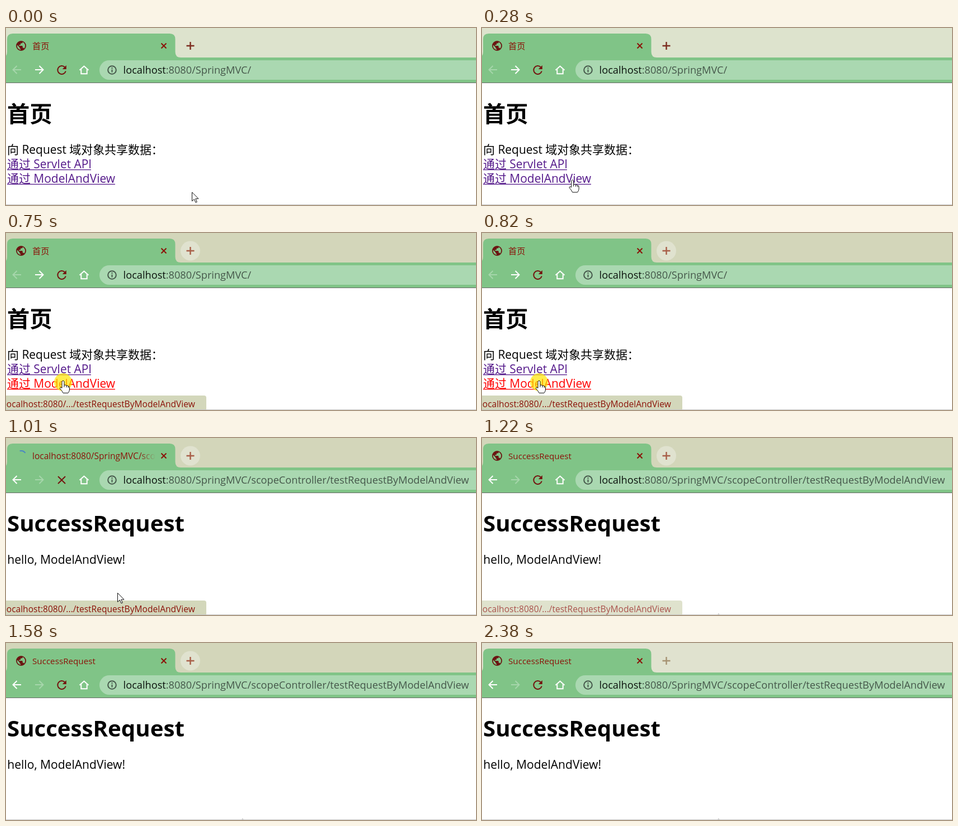
An HTML page for the animation above (2.45 s loop, 840 by 318 pixels).

```html
<!DOCTYPE html>
<html lang="zh-CN">
<head>
<meta charset="utf-8">
<title>SpringMVC</title>
<style>
html, body { margin: 0; width: 100%; height: 100%; overflow: hidden; background: #fff; }
svg { display: block; width: 100%; height: 100%; }
text { font-family: "Open Sans", "Noto Sans CJK SC", "Noto Sans CJK JP", sans-serif; white-space: pre; }
.tab { font-size: 15.2px; fill: #8b1209; }
.status { font-size: 15.55px; fill: #8b1209; }
.url { font-size: 18.18px; fill: #45574a; }
.url .host { fill: #0b120d; }
.h1 { font-size: 40.2px; font-weight: 700; }
.p { font-size: 20.95px; }
.icon { fill: none; stroke-width: 2; }
.link { fill: #551a8b; }
</style>
</head>
<body>
<svg viewBox="0 0 840 318" xmlns="http://www.w3.org/2000/svg">
  <defs>
    <linearGradient id="fade" gradientUnits="userSpaceOnUse" x1="238" y1="0" x2="267" y2="0">
      <stop offset="0" stop-color="#8b1209"/>
      <stop offset="1" stop-color="#8b1209" stop-opacity="0"/>
    </linearGradient>
    <path id="arrow" d="M16 0H1.5M8.5 -7L1.5 0 8.5 7"/>
  </defs>

  <rect width="840" height="318" fill="#fff"/>

  <!-- tab strip -->
  <rect id="strip" width="840" height="53"/>
  <circle id="plusBg" cx="329.5" cy="32" r="17.5" fill="#e0e2cf"/>
  <path id="plus" class="icon" d="M322.5 32H336.5M329.5 25V39" style="stroke-width:2.4"/>
  <path fill="#80c487" d="M-8 53Q2 53 2 43V20Q2 10 12 10H292.500Q302.500 10 302.500 20V43Q302.500 53 312.500 53Z"/>
  <path id="globe" fill="#6b1512" transform="translate(16.200 21.200) scale(.9)" d="M12 2A10 10 0 1 0 12 22 10 10 0 1 0 12 2ZM11 19.930C7 19.400 4 16 4 12Q4 11 4.210 10.210L9 15V16Q9 18 11 18ZM17.900 17.390Q17.400 16 16 16H15V13Q15 12 14 12H8V10H10Q11 10 11 9V7H13Q15 7 15 5V4.590C18 5.800 20 8.700 20 12Q20 15 17.900 17.390Z"/>
  <path id="spin" class="icon" d="M0 -9A9 9 0 0 1 8.5 -3" stroke="#4a86c4"/>
  <text id="tabHome" class="tab" x="47" y="37.5">首页</text>
  <text id="tabLoad" class="status" x="47" y="38" style="fill:url(#fade)">localhost:8080/SpringMVC/sco</text>
  <text id="tabDone" class="tab" x="47" y="38">SuccessRequest</text>
  <path class="icon" d="M277.500 27.500L286.500 36.500M286.500 27.500L277.500 36.500" stroke="#8b1209"/>

  <!-- toolbar -->
  <rect y="53" width="840" height="45" fill="#80c487"/>
  <rect y="98" width="840" height="1" fill="#686c68"/>
  <rect x="167" y="58" width="720" height="35" rx="17.5" fill="#aad8b1"/>
  <use id="back" class="icon" href="#arrow" x="11" y="75"/>
  <use id="forward" class="icon" href="#arrow" transform="translate(68 75) scale(-1 1)"/>
  <g id="reload">
    <path class="icon" d="M105 70.300A7.400 7.400 0 1 0 106.800 77.500" stroke="#74140f"/>
    <path d="M107.800 67V74H100.800Z" fill="#74140f"/>
  </g>
  <path id="stop" class="icon" d="M93 69L106 82M106 69L93 82" stroke="#74140f"/>
  <path class="icon" d="M131.500 75.800L139.500 68.500 147.500 75.800M134.300 74V82.300H144.700V74" stroke="#fff"/>
  <circle class="icon" cx="189.5" cy="75.500" r="7.300" stroke="#45574a"/>
  <path class="icon" d="M189.500 74.500V79.500M189.500 71V73" stroke="#45574a"/>
  <text class="url" x="209.6" y="82"><tspan class="host">localhost</tspan>:8080/SpringMVC/<tspan id="path">scopeController/testRequestByModelAndView</tspan></text>

  <!-- pages -->
  <g id="home">
    <text class="h1" x="2" y="169">首页</text>
    <text class="p" x="2" y="226">向 Request 域对象共享数据：</text>
    <g class="link">
      <text class="p" x="2" y="252">通过 Servlet API</text>
      <rect x="2" y="254" width="150" height="1.3"/>
    </g>
    <g id="link" class="link">
      <text class="p" x="2" y="278">通过 ModelAndView</text>
      <rect x="2" y="280" width="193" height="1.3"/>
    </g>
  </g>
  <g id="result">
    <text class="h1" x="2" y="168">SuccessRequest</text>
    <text class="p" x="2.3" y="226" style="font-size:21.05px">hello, ModelAndView!</text>
  </g>

  <g id="status">
    <path d="M0 292H354Q358 292 358 296V318H0Z" fill="#d3d7bb"/>
    <text class="status" x="-3.2" y="312.5">localhost:8080/.../testRequestByModelAndView</text>
  </g>
  <rect y="317" width="840" height="1" fill="#c6c6c6"/>

  <!-- pointer -->
  <circle id="glow" cx="102" cy="268" r="16" fill="#ffe600" fill-opacity=".7"/>
  <path id="tip" d="M421 317L422.500 314.500 425 317Z" fill="#d0d0d0"/>
  <path id="pointer" d="M.5 .5V16.500L4.300 13 7 19 9.300 18 6.800 12.200H12Z" fill="#fff" stroke="#111"/>
  <g id="hand" stroke="#111" stroke-linejoin="round">
    <path fill="#fff" d="M-2 2Q0 -1.500 2 2V8.500Q4.500 7 6 9.500 8.500 8 9.300 10.500 11.500 10 11.500 13V17Q11 20 9 22.500H0Q-2 18 -5.500 14.500 -6 11 -2 13.500Z"/>
    <path fill="none" d="M2 8.500V12M6 9.500V12.500M9.300 10.500V13"/>
  </g>
</svg>
<script>
const LOOP = 2450;
const TICKS = [0, 70, 140, 210, 280, 350, 480, 680, 750, 820, 890, 950, 1010, 1080, 1150,
  1220, 1290, 1360, 1430, 1510, 1580, 2380];
const PRESS = 680, RELEASE = 890, COMMIT = 950, REST = 1150, LOADED = 1220, BLUR = 2380;

const $ = id => document.getElementById(id);
const set = (id, name, value) => $(id).setAttribute(name, value);
const show = (id, on) => set(id, 'opacity', Number(on));
const clamp = v => Math.max(0, Math.min(1, v));
const part = (t, a, b) => clamp((t - a) / (b - a));
const mix = (a, b, k) => a + (b - a) * k;

function pointerAt(t) {
  if (t < RELEASE) {
    const k = part(t, 0, 420), e = k * k * (3 - 2 * k);
    return [mix(332, 102, e), mix(294.5, 265, e)];
  }
  if (t < 1010) {
    const k = part(t, 820, 1010);
    return [mix(102, 199, k * k), mix(265, 278, k)];
  }
  const k = part(t, 1010, REST);
  return [mix(199, 421, k), mix(278, 315, k)];
}

function draw(now) {
  const time = now % LOOP;
  const t = TICKS.filter(v => v <= time).pop();
  const focused = t >= PRESS && t < BLUR;
  const loading = t >= RELEASE && t < LOADED;
  const committed = t >= COMMIT;

  set('strip', 'fill', focused ? '#d3d6ba' : t < PRESS ? '#dde3cd' : '#e0e2cf');
  set('plus', 'stroke', focused ? '#a85e48' : t < PRESS ? '#7d2d20' : '#a69272');
  show('plusBg', focused);

  show('globe', !loading);
  show('spin', loading);
  set('spin', 'transform', `translate(27 32) rotate(${(t - 1010) * 0.5 - 15})`);
  show('tabHome', !committed);
  show('tabLoad', committed && loading);
  show('tabDone', t >= LOADED);
  show('reload', !loading);
  show('stop', loading);
  set('back', 'stroke', committed ? '#fff' : '#a6d6ab');
  set('forward', 'stroke', committed ? '#a6d6ab' : '#fff');
  $('path').style.display = committed ? '' : 'none';

  show('home', !committed);
  show('result', committed);
  $('link').style.fill = t >= PRESS && t < RELEASE ? '#f00' : '';
  show('status', t < LOADED ? part(t, 280, 420) : 0.72 * (1 - part(t, LOADED, 1580)));

  const [x, y] = pointerAt(t);
  const onLink = t >= 280 && t < COMMIT;
  for (const id of ['pointer', 'hand']) set(id, 'transform', `translate(${x} ${y})`);
  show('hand', onLink);
  show('pointer', !onLink && t < REST);
  show('tip', t >= REST);
  show('glow', t >= PRESS && t < RELEASE);
}

const start = performance.now();
function loop() {
  draw(performance.now() - start);
  requestAnimationFrame(loop);
}
loop();
</script>
</body>
</html>
```
